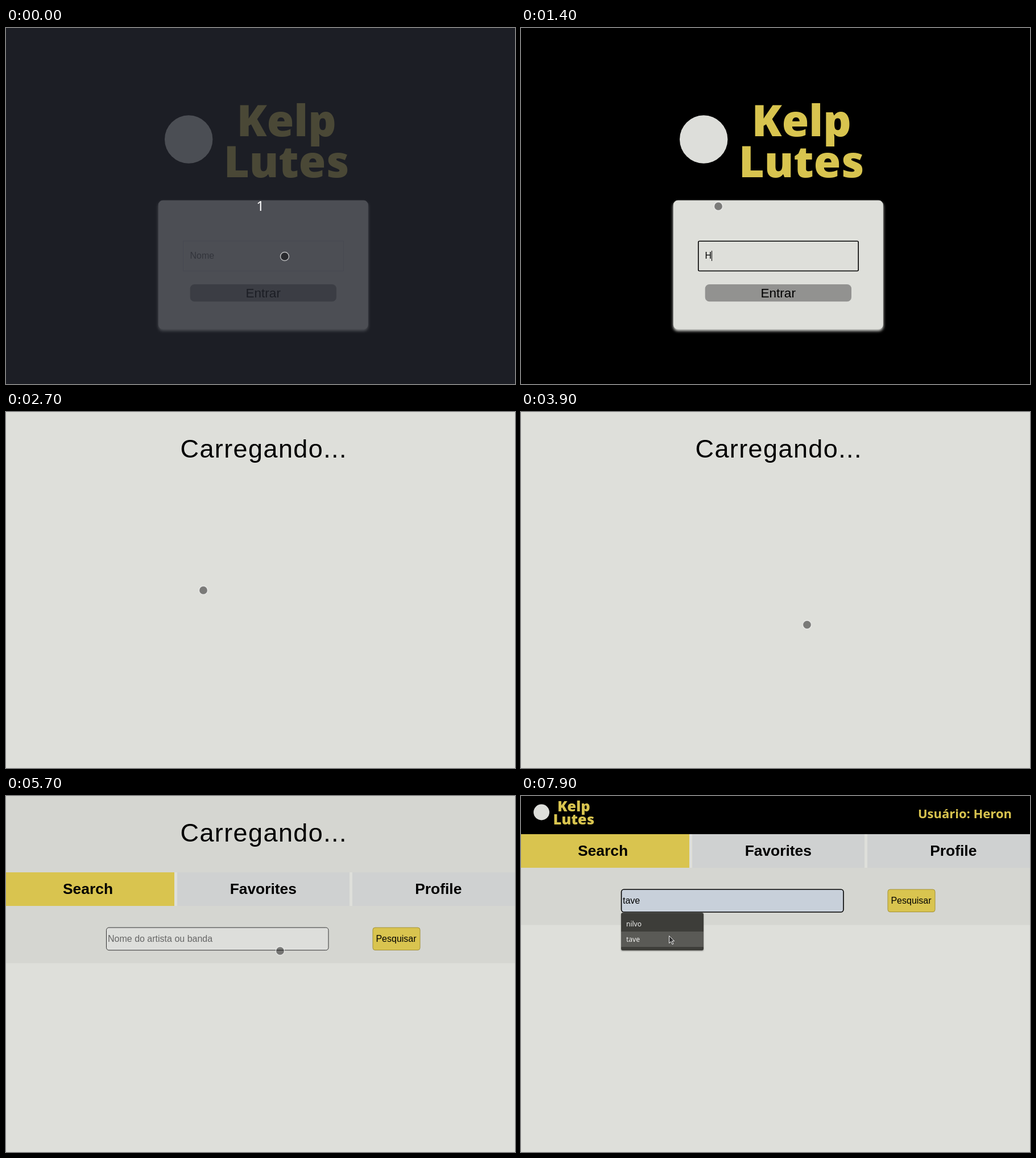
Recreate the animation shown at these times as an HTML page. Size 895x625 px, loop 8 s.

```html
<!DOCTYPE html>
<html lang="pt">
<head>
<meta charset="utf-8">
<title>Login e busca</title>
<style>
  html, body { margin: 0; width: 100%; height: 100%; overflow: hidden; background: #000; }
  svg { display: block; width: 100vw; height: 100vh; }
  text { font: 16px "Liberation Sans", Arial, sans-serif; white-space: pre; }
  .mid { text-anchor: middle; }
  .hint { fill: #666; }
  .yellow { fill: #d9c44f; }
  .brand text { font: 800 77px "Open Sans", sans-serif; text-anchor: middle; fill: #d8c44f; }
  .panel { fill: #dedfda; filter: drop-shadow(0 3px 2.5px #dedfda); }
  .enter { font-size: 22.6px; }
  .loading { font-size: 45px; letter-spacing: 1.4px; }
  .tab { font-weight: bold; font-size: 26.4px; text-anchor: middle; }
  .user { font: 600 22px "Noto Sans", sans-serif; text-anchor: end; }
  .option { font: 500 12px "Noto Sans", sans-serif; fill: #f0f0ee; }
  .count { font: 24px "Noto Sans", sans-serif; fill: #fff; }
  .menu { filter: drop-shadow(0 1px 1px #0006); }
</style>
</head>
<body>
<svg viewBox="0 0 895 625" preserveAspectRatio="none">
  <defs>
    <g id="brand" class="brand">
      <circle r="42.2" fill="#dddeda"/>
      <text x="172" y="-5.5">Kelp</text>
      <text x="172" y="66.5">Lutes</text>
    </g>
  </defs>

  <g id="login">
    <rect width="895" height="625"/>
    <use href="#brand" x="321.2" y="195.5"/>
    <rect class="panel" x="267.8" y="302.6" width="369" height="226.2" rx="8"/>
    <rect id="nameBox" fill="none"/>
    <text id="nameHint" class="hint" x="323.5" y="405">Nome</text>
    <text id="nameText" x="323.5" y="405"></text>
    <rect id="caret" y="391" width="1" height="18"/>
    <rect id="enterBox" x="323.7" y="450" width="257.3" height="30.3" rx="7.5"/>
    <text class="enter mid" x="452.2" y="473">Entrar</text>
    <g id="countdown">
      <rect width="895" height="625" fill="#242730" opacity=".784"/>
      <text class="count mid" x="447" y="321">1</text>
    </g>
  </g>

  <g id="app">
    <rect width="895" height="625" fill="#dedfda"/>
    <g id="search">
      <rect y="-67" width="895" height="293.5" fill="#d5d6d1"/>
      <rect y="67" width="895" height="59" fill="#dedfda"/>
      <rect class="yellow" y="67" width="296" height="59"/>
      <rect x="301" y="67" width="303" height="59" fill="#cfd1d1"/>
      <rect x="609" y="67" width="286" height="59" fill="#cfd1d1"/>
      <text class="tab" x="144" y="105">Search</text>
      <text class="tab" x="452.3" y="105">Favorites</text>
      <text class="tab" x="760.3" y="105">Profile</text>
      <rect id="artistBox" x="176.5" y="164" width="390.5" height="39.7" rx="4.5"/>
      <text id="artistText" x="179" y="189"></text>
      <rect class="yellow" x="645" y="164" width="83" height="39.5" rx="4" stroke="#a39238"/>
      <text class="mid" x="686" y="189">Pesquisar</text>
    </g>
    <text id="loading" class="loading" x="306.5" y="80">Carregando...</text>
    <g id="header">
      <rect width="895" height="67"/>
      <use href="#brand" transform="translate(36 28.5) scale(.33)"/>
      <text class="user yellow" x="863" y="39">Usuário: Heron</text>
    </g>
    <g id="menu" class="menu">
      <rect x="176" y="205" width="145" height="66" rx="3" fill="#3d3d39"/>
      <rect id="hover" x="176" y="238" width="145" height="27" fill="#5a5a56"/>
      <text class="option" x="185" y="229">nilvo</text>
      <text class="option" x="185" y="256">tave</text>
    </g>
  </g>

  <g id="pointer">
    <circle id="dot" r="7.5" fill="#000" fill-opacity=".45" stroke="#fff" stroke-opacity=".65" stroke-width="1.4"/>
    <path id="arrow" d="M-3.5-7.5v13l3-3 2.5 5 2-1-2.4-4.8h4z" fill="#333" stroke="#eee"/>
  </g>
</svg>
<script>
const LOOP = 8000, STEP = 100, FOCUS_WIDTH = 1.6;
const $ = id => document.getElementById(id);
const show = (id, on) => $(id).style.display = on ? "" : "none";
const set = (id, attrs) => {
  for (const key in attrs) $(id).setAttribute(key, attrs[key]);
};

// Pointer stops: time, x, y
const path = [
  [0, 490, 401], [500, 490, 401], [700, 478, 394], [800, 478, 394], [1000, 347, 313],
  [3600, 347, 313], [3700, 895, 566], [3800, 895, 566], [4000, 111, 181],
  [4200, 111, 181], [4500, 150, 92], [4700, 199, 111], [4800, 199, 111],
  [5300, 400, 225], [5500, 490, 286], [5700, 482, 272], [6000, 471, 246],
  [6100, 471, 246], [6500, 465, 202], [6600, 465, 202], [6900, 460.5, 198],
  [7200, 460.5, 198], [7500, 340, 226], [7700, 276, 245], [7900, 264, 253]
];
const keyTimes = [1400, 1500, 1800, 2300, 2400];
const userName = "Heron";

function pointerAt(t) {
  const i = path.findIndex(p => p[0] >= t);
  if (i < 1) return path[0].slice(1);
  const [t0, x0, y0] = path[i - 1], [t1, x1, y1] = path[i];
  const k = (t - t0) / (t1 - t0);
  return [x0 + (x1 - x0) * k, y0 + (y1 - y0) * k];
}

function drawLogin(t) {
  const focused = t >= 400;
  const typed = keyTimes.filter(k => t >= k).length;
  show("countdown", t < 300);
  set("nameBox", focused
    ? { x: 311.8, y: 374.3, width: 281.4, height: 52.2, rx: 2, stroke: "#000", "stroke-width": FOCUS_WIDTH }
    : { x: 311.5, y: 374, width: 282, height: 52.5, rx: 0, stroke: "#c3c4cb", "stroke-width": 1 });
  show("nameHint", !typed);
  $("nameText").textContent = userName.slice(0, typed);
  set("caret", { x: 323.5 + (typed ? $("nameText").getComputedTextLength() : 0) });
  show("caret", focused && (t < 900 || t >= 1400));
  set("enterBox", { fill: typed >= 3 ? "#d9c44f" : "#929290" });
}

function drawApp(t) {
  const ready = t >= 5800, focused = t >= 7000, preview = t >= 7600;
  show("search", t >= 4300);
  set("search", { transform: `translate(0 ${ready ? 0 : 67})` });
  show("loading", !ready);
  show("header", ready);
  set("artistBox", {
    fill: preview ? "#c8d0da" : "#dddedb",
    stroke: focused ? "#000" : "#333",
    "stroke-width": focused ? FOCUS_WIDTH : 1
  });
  $("artistText").textContent = preview ? "tave" : "Nome do artista ou banda";
  set("artistText", { class: preview ? "" : "hint" });
  show("menu", focused);
  show("hover", preview);
}

function draw(t) {
  const inApp = t >= 2700;
  show("login", !inApp);
  show("app", inApp);
  (inApp ? drawApp : drawLogin)(t);
  set("pointer", { transform: `translate(${pointerAt(t)})` });
  show("pointer", t < 3400 || t >= 3700);
  show("dot", t < 7600);
  show("arrow", t >= 7600);
}

function tick() {
  draw(Math.floor(performance.now() % LOOP / STEP) * STEP);
  requestAnimationFrame(tick);
}
tick();
</script>
</body>
</html>
```
